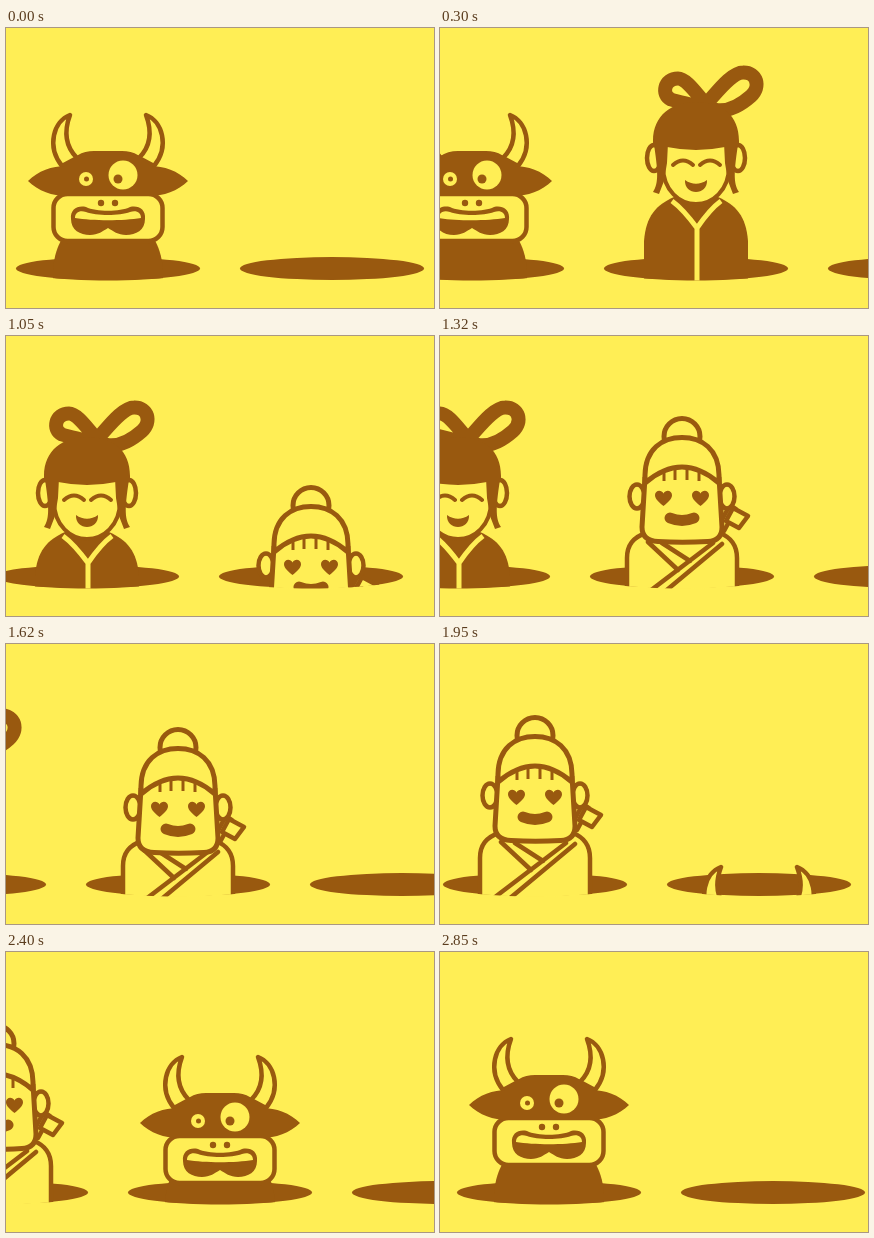
An HTML page that plays this animation: 428 by 280 pixels, repeating every 2880 ms.

```html
<!DOCTYPE html>
<html lang="en">
<head>
<meta charset="utf-8">
<title>Characters popping out of holes</title>
<style>
  html, body { margin: 0; width: 100%; height: 100%; overflow: hidden; background: #ffee55; }
  svg { display: block; --y: #ffee55; --b: #99590f; }
  .b { fill: var(--b); }
  .y { fill: var(--y); }
  .o { fill: var(--y); stroke: var(--b); stroke-width: 4.5; stroke-linejoin: round; }
  .l { fill: none; stroke: var(--b); stroke-width: 4.5; stroke-linecap: round; }
</style>
</head>
<body>
<svg id="stage" width="428" height="280" viewBox="0 0 428 280">
  <defs>
    <clipPath id="ground"><path d="M-120 0H120V240.500H92.500A92.500 12 0 0 1-92.500 240.500H-120Z"/></clipPath>

    <g id="bull-body">
      <path class="b" d="M-46 211H46C50 217 54 228 55 242V300H-55V242C-54 228-50 217-46 211Z"/>
    </g>
    <g id="bull-head">
      <path id="horn" class="o" d="M-38 87C-54 93-62 118-46 138L-31 130C-43 118-44 103-38 87Z"/>
      <use href="#horn" transform="scale(-1 1)"/>
      <rect class="o" x="-54.500" y="166" width="109" height="47" rx="14"/>
      <path class="b" d="M-80 153C-70 143-56 138-42 138C-36 129-26 123-14 123H14C26 123 36 129 42 138C56 138 70 143 80 153C70 163 55 168 42 168H-42C-55 168-70 163-80 153Z"/>
      <circle class="y" cx="-22" cy="151" r="7"/>
      <circle class="b" cx="-21.500" cy="151" r="2.500"/>
      <circle class="y" cx="15" cy="147" r="14.500"/>
      <circle class="b" cx="10" cy="151" r="4.500"/>
      <circle class="b" cx="-7" cy="175" r="3.200"/>
      <circle class="b" cx="7" cy="175" r="3.200"/>
      <path class="b" d="M-37 191C-38 181-30 177-22 179C-12 184 12 184 22 179C30 177 38 181 37 191C37 202 28 207 18 207C10 207 5 203 0 200C-5 203-10 207-18 207C-28 207-37 202-37 191Z"/>
      <path class="y" d="M-33 190C-33 184-28 182-22 184C-12 188 12 188 22 184C28 182 33 184 33 190C15 193-15 193-33 190Z"/>
    </g>

    <g id="girl-body">
      <path class="b" d="M-22 196C-40 204-50 215-52 240V300H52V240C50 215 40 204 22 196Z"/>
      <path d="M-24 200Q-13 208 1 227V300M25 200Q14 208 1 227" fill="none" stroke="var(--y)" stroke-width="5"/>
    </g>
    <g id="girl-head">
      <path class="l" stroke-linejoin="round" style="stroke-width:14" d="M8 101C0 92-10 77.500-18 77.500C-32 77.500-35 94-25 98.500C-15 102 0 104 8 108M12 101C22 90 36 71.500 47 71.500C61 71 65 86 55 95C46 103 33 111 20 109"/>
      <ellipse class="o" cx="-42" cy="157" rx="7" ry="13"/>
      <ellipse class="o" cx="42" cy="157" rx="7" ry="13"/>
      <path class="o" style="stroke-width:4" d="M-33 142V165C-33 190-16 203 0 203C16 203 33 190 33 165V142Z"/>
      <path id="lock" class="b" d="M-42.500 140L-28 142L-29 162L-32 180L-37 193L-43 191C-37 182-38 170-42.500 140Z"/>
      <use href="#lock" transform="scale(-1 1)"/>
      <path class="b" d="M-43 146V140C-43 114-24 101 0 101C26 101 43 114 43 140V146H29Q0 152 -29 146Z"/>
      <path class="l" style="stroke-width:4" d="M-23 164Q-13 155-3 164M4 164Q14 155 24 164"/>
      <path class="b" d="M-11 179C-4 184 4 184 11 179C12 195-12 195-11 179Z"/>
    </g>

    <g id="man-body">
      <path class="o" d="M-36 189C-48 193-55 200-55 214V300H55V214C55 200 48 193 38 189Z"/>
      <path class="l" d="M31 199L-36 250L-54 264M40 200L-20 250L-54 278M-34 198L-4 226M-20 199L8 217"/>
    </g>
    <g id="man-head">
      <path class="o" d="M48 160L54 164L42 186L36 182Z"/>
      <path class="o" d="M51 163L66 171L57 183L44 176Z"/>
      <ellipse class="o" cx="-45" cy="151.500" rx="7.500" ry="12"/>
      <ellipse class="o" cx="45" cy="151.500" rx="7.500" ry="12"/>
      <circle class="o" cy="91.500" r="18" style="stroke-width:5"/>
      <path class="o" style="stroke-width:5" d="M-37 132L-40 182Q-40 196-24 196.500Q0 198 26 196.500Q40 196 40 182L37 132"/>
      <path class="o" style="stroke-width:5" d="M-37 138V130C-36.500 104-20 92.500 0 92.500C20 92.500 36.500 104 37 130V138Q0 106-37 138Z"/>
      <path class="l" style="stroke-width:3;stroke-linecap:butt" d="M-18 124V136M-7 122V135M5 122V135M17 124V136"/>
      <path id="heart" class="b" d="M-18.500 161C-25 156-27 153-27 150C-27 145-20.500 144-18.500 148.500C-16.500 144-10 145-10 150C-10 153-12 156-18.500 161Z"/>
      <use href="#heart" x="37"/>
      <path class="l" style="stroke-width:11" d="M-12 173Q0 178 12 173"/>
    </g>
  </defs>
</svg>
<script>
  const LOOP = 2880, STEP = 30, BEAT = 960, GAP = 224;
  const stage = document.getElementById('stage');

  function add(parent, tag, attrs = {}) {
    const el = document.createElementNS('http://www.w3.org/2000/svg', tag);
    for (const key in attrs) el.setAttribute(key, attrs[key]);
    return parent.appendChild(el);
  }

  const slots = ['bull', 'girl', 'man', 'bull', 'girl'].map(name => {
    const slot = add(stage, 'g');
    add(slot, 'ellipse', { class: 'b', cy: 240.5, rx: 92, ry: 11.5 });
    const figure = add(slot, 'g', { 'clip-path': 'url(#ground)' });
    const body = add(figure, 'use', { href: `#${name}-body` });
    const head = add(figure, 'use', { href: `#${name}-head` });
    return { slot, body, head };
  });

  const sineOut = p => Math.sin(Math.min(p, 1) * Math.PI / 2);
  const sineInOut = p => (1 - Math.cos(Math.PI * Math.min(p, 1))) / 2;

  // Distance below the resting height: pop up too far, sink, then settle.
  function drop(u) {
    if (u <= 0) return 200;
    if (u < 300) return 166 - 193 * sineOut(u / 300);
    if (u < 540) return -27 + 45 * sineOut((u - 300) / 100);
    return 18 * (1 - sineInOut((u - 540) / 300));
  }

  function draw() {
    const t = Math.floor(performance.now() % LOOP / STEP) * STEP;
    slots.forEach(({ slot, body, head }, i) => {
      const x = 102 + GAP * i - GAP * t / BEAT;
      const u = t - BEAT * (i - 1);
      const y = Math.round(drop(u));
      slot.setAttribute('transform', `translate(${x} 0)`);
      head.setAttribute('y', y);
      // The body sinks less than the head after the overshoot.
      body.setAttribute('y', u > 300 ? Math.min(y, 8) : y);
    });
    requestAnimationFrame(draw);
  }
  draw();
</script>
</body>
</html>
```
